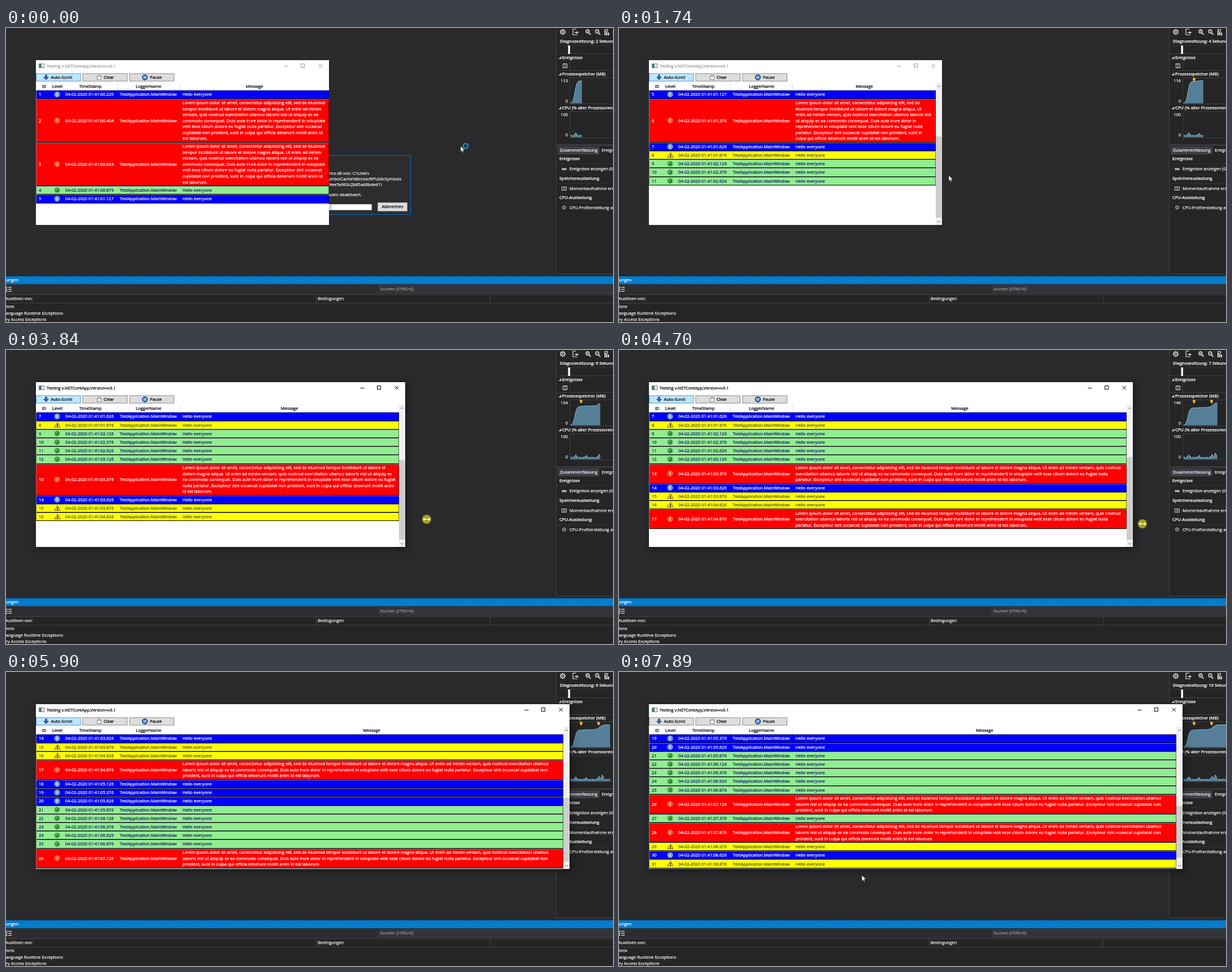
Animation of 1075 by 521 pixels, one loop 8000 ms. Source, as an HTML page with a canvas:

```html
<!DOCTYPE html>
<html lang="de">
<head>
<meta charset="utf-8">
<title>Log viewer</title>
<style>
html, body { margin: 0; width: 1075px; height: 521px; overflow: hidden; background: #2a2a2c; }
canvas { display: block; }
</style>
</head>
<body>
<canvas id="stage" width="1075" height="521"></canvas>
<script>
const g = document.getElementById('stage').getContext('2d');
const LOOP = 8000, STEP = 110, CLICK = 7680, SIZE = 7.5;
const LEFT = 53, TOP = 57, BOTTOM = 349, LIST_TOP = 110.4, LIST_HEIGHT = 238, LINE = 10.55;

// One letter per 250 ms tick of the logger; a dash is a tick without an entry.
const log = [...'ieedieiwddd-deiw--weiiiddddded-e-wiwe'].map((kind, i) => {
  const stamp = 126 + 250 * i + Math.round(94 * .3 ** i), due = stamp - 1225;
  // Entries pile up while the window is being resized.
  return { kind, stamp, arrives: Math.max(due, Math.min(5020, 3900 + (due - 3651) * 4)) };
}).filter(e => e.kind !== '-').map((e, i) => ({ ...e, id: i + 1 }));
const skin = { i: ['#0000ff', '#fff'], e: ['#ff0000', '#fff'], d: ['#90ee90', '#191970'], w: ['#ffff00', '#55552a'] };
const lorem = ('Lorem ipsum dolor sit amet, consectetur adipisicing elit, sed do eiusmod tempor incididunt ut labore et ' +
  'dolore magna aliqua. Ut enim ad minim veniam, quis nostrud exercitation ullamco laboris nisi ut aliquip ex ea ' +
  'commodo consequat. Duis aute irure dolor in reprehenderit in voluptate velit esse cillum dolore eu fugiat nulla ' +
  'pariatur. Excepteur sint occaecat cupidatat non proident, sunt in culpa qui officia deserunt mollit anim id est laborum.').split(' ');

const edgeKeys = [[3380, 572], [3850, 707], [4730, 910], [5030, 998]];
const pointerKeys = [[0, 805, 209], [1760, 584, 261], [2640, 572, 289], [3380, 580, 298], [3850, 745, 300],
  [4730, 927, 308], [5030, 1006, 309], [5940, 536, 187], [6900, 112, 91], [7560, 112, 91], [7920, 430, 360]];

const rise = (x, mid, width) => 1 / (1 + Math.exp((mid - x) / width));
const bump = (x, mid, height) => height * Math.exp(-(((x - mid) / 2) ** 2));
const memory = x => 113 * rise(x, 1007.5, 1.8) + 2.6 * rise(x, 1025, 1.5) + 32 * rise(x, 1051.45, 2.6);
const cpu = x => 7 + 5 * Math.sin(1.7 * x) * Math.sin(.6 * x + 1) +
  bump(x, 1009, 13) + bump(x, 1027, 9) + bump(x, 1050, 14) + bump(x, 1056, 21);

function at(keys, t) {
  const i = keys.findIndex(k => k[0] >= t);
  if (i < 1) return keys[i ? keys.length - 1 : 0].slice(1);
  const a = keys[i - 1], b = keys[i], p = (t - a[0]) / (b[0] - a[0]);
  return a.slice(1).map((v, k) => v + (b[k + 1] - v) * p);
}

function font(weight = 400, size = SIZE) {
  g.font = `${weight} ${size}px "Open Sans", "Noto Sans", sans-serif`;
}
function text(s, x, y, color = '#f1f1f1', align = 'left', weight = 400) {
  font(weight);
  g.fillStyle = g.strokeStyle = color;
  g.textAlign = align;
  g.lineWidth = .25;
  g.fillText(s, x, y + 2.4);
  g.strokeText(s, x, y + 2.4);
}
function rect(x, y, x2, y2, fill, stroke) {
  if (fill) { g.fillStyle = fill; g.fillRect(x, y, x2 - x, y2 - y); }
  if (stroke) { g.strokeStyle = stroke; g.lineWidth = 1; g.strokeRect(x + .5, y + .5, x2 - x - 1, y2 - y - 1); }
}
function path(points, fill, stroke, width = 1) {
  g.beginPath();
  points.forEach(([x, y]) => g.lineTo(x, y));
  if (fill) { g.closePath(); g.fillStyle = fill; g.fill(); }
  if (stroke) { g.strokeStyle = stroke; g.lineWidth = width; g.stroke(); }
}
function disc(x, y, r, fill, stroke, width = 1) {
  g.beginPath();
  g.arc(x, y, r, 0, 7);
  if (fill) { g.fillStyle = fill; g.fill(); }
  if (stroke) { g.strokeStyle = stroke; g.lineWidth = width; g.stroke(); }
}
function star(x, y, inner, outer, spikes, fill) {
  const points = [];
  for (let i = 0; i < spikes * 2; i++) {
    const r = i % 2 ? inner : outer, a = i * Math.PI / spikes;
    points.push([x + r * Math.cos(a), y + r * Math.sin(a)]);
  }
  path(points, fill);
}
const hline = (y, a, b, c) => rect(a, y, b, y + 1, c);
const vline = (x, a, b, c) => rect(x, a, x + 1, b, c);

function magnifier(x, plus) {
  disc(x - 1, 6, 3, null, '#e4e4e4', 1.3);
  path([[x + 1, 8], [x + 4.5, 12]], null, '#e4e4e4', 1.8);
  path([[x - 2.5, 6], [x + .5, 6]], null, '#e4e4e4');
  if (plus) path([[x - 1, 4.5], [x - 1, 7.5]], null, '#e4e4e4');
}

function chart(value, edge, base, max) {
  const line = [];
  for (let x = 1000; x <= edge; x++) line.push([x, base - 40 * value(x) / max]);
  path([[1000, base], ...line, [edge, line[line.length - 1][1]], [edge, base]], '#557f98');
  path(line, null, '#8fc0dc', .9);
}

function diagnostics(t) {
  const rule = '#3f3f46', light = '#e4e4e4';
  const head = (s, x, y) => text(s, x, y, '#f1f1f1', 'left', 600);
  rect(974, 0, 1075, 436, '#252526');
  vline(974, 0, 436, rule);
  hline(435, 974, 1075, rule);
  star(986, 7, 3.6, 6, 8, light);
  disc(986, 7, 2.6, '#252526');
  disc(986, 7, 1.2, light);
  path([[1010, 2], [1004, 2], [1004, 12], [1012, 12]], null, light, 1.2);
  path([[1007, 8], [1013, 8]], null, light, 1.4);
  path([[1010.5, 5.5], [1014, 8], [1010.5, 10.5]], light);
  magnifier(1031, true);
  magnifier(1048, false);
  rect(1060, 2, 1066, 6, null, light);
  for (let i = 0; i < 3; i++) rect(1060 + i * 3, 6 + i, 1062 + i * 3, 13, light);

  head(`Diagnosesitzung: ${2 + Math.floor(t / 1000 + .6)} Sekunden`, 981, 23.5);
  hline(30, 975, 1075, '#333337');
  hline(45, 975, 1075, rule);
  rect(995.5, 31, 999, 46, '#fff');
  const fold = (s, y) => {
    path([[983.5, y - 3], [983.5, y + 2], [978.5, y + 2]], '#d0d0d0');
    head(s, 985, y);
  };
  const plot = (title, y, top, value, max, scale) => {
    const edge = 1020 + 8.4 * t / 1000;
    fold(title, y);
    rect(998, y + 6, 1080, y + 53, null, rule);
    text(top, 995, y + 12, '#f1f1f1', 'right');
    text('0', 995, y + 47.5, '#f1f1f1', 'right');
    chart(value, edge, y + 51.5, max);
  };
  fold('Ereignisse', 53);
  vline(998, 59, 75, rule);
  hline(75, 975, 1075, rule);
  rect(986, 63, 994, 71, null, light);
  vline(989.5, 64, 70, light);
  const peak = memory(1020 + 8.4 * t / 1000);
  plot('Prozessspeicher (MB)', 82, Math.round(peak), memory, peak);
  const marker = x => path([[x - 2.3, 88.5], [x + 2.3, 88.5], [x + 2.3, 92], [x, 95], [x - 2.3, 92]], '#f0b04c');
  if (t > 500) marker(1018.5);
  if (t > 4250) marker(1049.5);
  plot('CPU (% aller Prozessoren)', 142, '100', cpu, 100);

  rect(975, 206, 1075, 209, '#3a3a3f');
  rect(977, 210, 1051, 224, rule);
  text('Zusammenfassung', 981, 217);
  text('Ereignisse', 1055, 217);
  const section = (title, item, y) => {
    head(title, 980, y);
    hline(y + 8, 975, 1075, '#333337');
    text(item, 998, y + 17.5);
  };
  section('Ereignisse', 'Ereignisse anzeigen (0 von 0)', 232);
  section('Speicherauslastung', 'Momentaufnahme erstellen', 267);
  section('CPU-Auslastung', 'CPU-Profilerstellung aufzeichnen', 301);
  for (const x of [986, 988.7, 991.4]) path([[x - 2, 250], [x, 247.5], [x + 1.5, 250], [x, 252.5]], '#c8c8c8');
  rect(984, 281, 993, 288, null, '#d0d0d0');
  disc(988.5, 284.5, 1.5, null, '#d0d0d0');
  disc(988.5, 318, 3, '#555', '#bbb');
}

function bottomPane() {
  const rule = '#3f3f46';
  rect(0, 440, 1075, 454, '#007acc');
  g.fillStyle = '#2b93da';
  for (let x = 24; x < 1075; x += 4)
    for (let i = 0; i < 3; i++) g.fillRect(x + i % 2 * 2, 445 + i * 2, 1, 1);
  text('ungen', 0, 447, '#fff');
  rect(0, 454, 1075, 472, '#2d2d30');
  rect(0, 472, 1075, 521, '#252526');
  for (const y of [459.5, 463, 466.5]) {
    path([[4, y], [10, y]], null, '#e0e0e0', 1.3);
    path([[0, y], [2.5, y]], null, '#e0e0e0', 1.8);
  }
  rect(660, 456, 1076, 470, '#333337', rule);
  text('Suchen (STRG+E)', 663, 463, '#999');
  hline(472, 0, 1075, rule);
  hline(487, 0, 1075, rule);
  vline(549, 472, 487, rule);
  vline(857, 472, 487, rule);
  text('Auslösen von:', -1, 480);
  text('Bedingungen', 552, 480);
  ['ions', 'anguage Runtime Exceptions', 'ry Access Exceptions'].forEach((s, i) => text(s, 0, 494 + i * 11.2));
}

function symbolDialog() {
  const ending = (s, x, y) => text(s, x, y, '#f1f1f1', 'right');
  rect(300, 225, 717, 331, '#2d2d30', '#0a6cb4');
  ending('Generics.dll von: C:\\Users', 643, 258);
  ending('SymbolCache\\MicrosoftPublicSymbols', 700, 268);
  ending('2f4ee5a963c2b85ad6bded1\\', 666, 278);
  ending('Symbolen deaktiviert.', 630, 296);
  rect(400, 312, 648, 323, '#fff', '#bcbcbc');
  rect(560, 313, 577, 322, '#d2d2d2');
  rect(658, 309, 711, 325, '#ddd', '#9a9a9a');
  text('Abbrechen', 684.5, 317, '#000', 'center');
}

function icon(kind, x, y) {
  if (kind === 'i') {
    disc(x, y, 4.6, '#6f9cc4', '#b4cfe6', .8);
    text('i', x, y, '#fff', 'center', 700);
  } else if (kind === 'e') {
    disc(x, y, 4.6, '#e4572e', '#f2906c', .8);
    text('!', x, y, '#fff', 'center', 700);
  } else if (kind === 'w') {
    path([[x + 1, y - 5], [x + 5.5, y + 4], [x - 5, y + 4], [x + 1, y - 5]], '#ffd83c', '#6b5a10', .9);
    text('!', x + .7, y + 1, '#000', 'center', 700);
  } else {
    star(x, y, 3.4, 6, 10, '#37803a');
    disc(x - 1, y - 1, 1.7, '#6fb25c');
  }
}

function wrap(right) {
  font(400, 100);
  const limit = (right - 318) / SIZE * 100, lines = [lorem[0]];
  for (const word of lorem.slice(1)) {
    const longer = lines[lines.length - 1] + ' ' + word;
    if (g.measureText(longer).width > limit) lines.push(word);
    else lines[lines.length - 1] = longer;
  }
  return lines;
}

const rowHeight = (entry, lines) => entry.kind === 'e' ? lines * LINE + 3.4 : 15.2;
const countAt = t => log.filter(e => e.arrives <= t).length;

// Auto-scroll keeps as many of the newest rows as fit.
function firstRow(n, lines, most) {
  let first = n, height = rowHeight(log[n - 1], lines);
  while (first > 1 && n - first + 1 < most) {
    height += rowHeight(log[first - 2], lines);
    if (height > LIST_HEIGHT) break;
    first--;
  }
  return first;
}

function rows(first, n, right) {
  const message = wrap(right);
  g.save();
  g.beginPath();
  g.rect(LEFT, 110, right - LEFT, LIST_HEIGHT + .8);
  g.clip();
  let y = LIST_TOP;
  for (const entry of log.slice(first - 1, n)) {
    const [back, ink] = skin[entry.kind], lines = entry.kind === 'e' ? message : ['Hello everyone'];
    const h = rowHeight(entry, lines.length), mid = y + h / 2;
    const top = Math.round(y), end = Math.round(y + h);
    rect(LEFT + .5, top + .5, right, end, '#000');
    rect(LEFT + 1, top + 1, right - .5, end - 1, back);
    text(entry.id, 58, mid, ink);
    icon(entry.kind, 90.5, mid - .3);
    text('04-02-2020 01:41:0' + (entry.stamp / 1000).toFixed(3), 105, mid, ink);
    text('TestApplication.MainWindow', 201.5, mid, ink);
    lines.forEach((s, i) => text(s, 312.5, mid + (i - (lines.length - 1) / 2) * LINE, ink));
    y += h;
  }
  g.restore();
}

function scrollbar(right, first, n, hover) {
  const x = right - 11, unit = 226 / n, y = 110 + unit * (first - 1);
  rect(x, 97, right, BOTTOM, '#f0f0f0');
  rect(x, y, right - .5, y + unit * Math.min(13, n - first + 1), hover ? '#a6a6a6' : '#cdcdcd');
  path([[x + 3, 104.5], [x + 5.5, 102], [x + 8, 104.5]], null, '#606060');
  path([[x + 3, 342], [x + 5.5, 344.5], [x + 8, 342]], null, '#606060');
}

function button(x, label, labelX, on) {
  rect(x, 80.5, x + 79.5, 94.5, on ? '#3c7fb1' : '#707070');
  rect(x + .8, 81.3, x + 78.7, 93.7, on ? '#bee6fd' : '#ddd');
  text(label, labelX, 87.7, '#000');
}

function logWindow(t) {
  const right = at(edgeKeys, t)[0], active = t >= 3380, ink = active ? '#000' : '#999';
  g.save();
  if (active) {
    g.shadowColor = 'rgba(0,0,0,.45)';
    g.shadowBlur = 12;
    g.shadowOffsetX = g.shadowOffsetY = 3;
  }
  rect(LEFT, TOP, right, BOTTOM, '#fff');
  g.restore();

  rect(58, 63, 68, 71, '#fff', '#777');
  rect(59, 64, 63, 70, '#3b7d8c');
  text('Testing v.NETCoreApp,Version=v3.1', 72, 67.3, ink);
  path([[right - 79.5, 67.5], [right - 72.5, 67.5]], null, ink);
  g.strokeRect(Math.round(right) - 49.5, 63.5, 6, 6);
  path([[right - 18.5, 63.5], [right - 12, 70]], null, ink);
  path([[right - 12, 63.5], [right - 18.5, 70]], null, ink);

  button(53, 'Auto-Scroll', 79.5, t < CLICK);
  path([[69.5, 83], [72.5, 83], [72.5, 87], [75.5, 87], [71, 92], [66.5, 87], [69.5, 87]], '#2f5f9e', '#1d3f70', .6);
  button(135.5, 'Clear', 173, false);
  rect(161, 85, 169, 92, '#f4f4f4', '#888');
  path([[163, 85], [165, 82.5], [168, 85]], null, '#888');
  button(218.5, 'Pause', 255, false);
  disc(246, 87.5, 4.8, '#1d5fb4', '#123f7c', .8);
  rect(243.8, 85, 245.3, 90, '#fff');
  rect(246.7, 85, 248.2, 90, '#fff');

  const n = countAt(t), first = firstRow(countAt(Math.min(t, CLICK)), wrap(right - 11).length, right > 572 ? n : 7);
  const scrolled = first > 1, view = scrolled ? right - 11 : right;
  [['ID', 67.5], ['Level', 91], ['TimeStamp', 149.5], ['LoggerName', 252.5], ['Message', (308 + view) / 2]]
    .forEach(([s, x]) => text(s, x, 103.8, '#000', 'center'));
  for (const x of [81, 101, 197, 307]) vline(x, 98, 110, '#e2e2e2');
  rows(first, n, view);
  if (scrolled) scrollbar(right, first, n, t >= 2300 && t < 3070);
}

function pointer(t) {
  const [x, y] = at(pointerKeys, t);
  if (t >= 3300 && t <= 5030) {
    disc(x, y, 8, '#a8a01c');
    path([[x - 5, y], [x + 5, y]], null, '#fff', 1.3);
    for (const s of [-1, 1]) path([[x + 6.5 * s, y], [x + 3 * s, y - 2.8], [x + 3 * s, y + 2.8]], '#fff');
  } else if (t >= 5700 && t <= 6050) {
    path([[x, y - 4], [x, y + 4]], null, '#8d8d8d');
    for (const s of [-4.5, 4.5]) path([[x - 2, y + s], [x + 2, y + s]], null, '#8d8d8d');
  } else {
    const arrow = [[0, 0], [0, 10.5], [2.4, 8.3], [4, 12], [5.6, 11.3], [4, 7.7], [7.3, 7.5], [0, 0]];
    path(arrow.map(([a, b]) => [x + a, y + b]), '#fff', '#111', .6);
    if (t < 600) disc(x + 9, y, 4.2, null, '#1f8fe6', 2.2);
  }
}

function draw() {
  const t = STEP * Math.round(performance.now() % LOOP / STEP);
  rect(0, 0, 1075, 521, '#2a2a2c');
  diagnostics(t);
  bottomPane();
  if (t < 430) symbolDialog();
  logWindow(t);
  pointer(t);
  requestAnimationFrame(draw);
}
draw();
</script>
</body>
</html>
```
